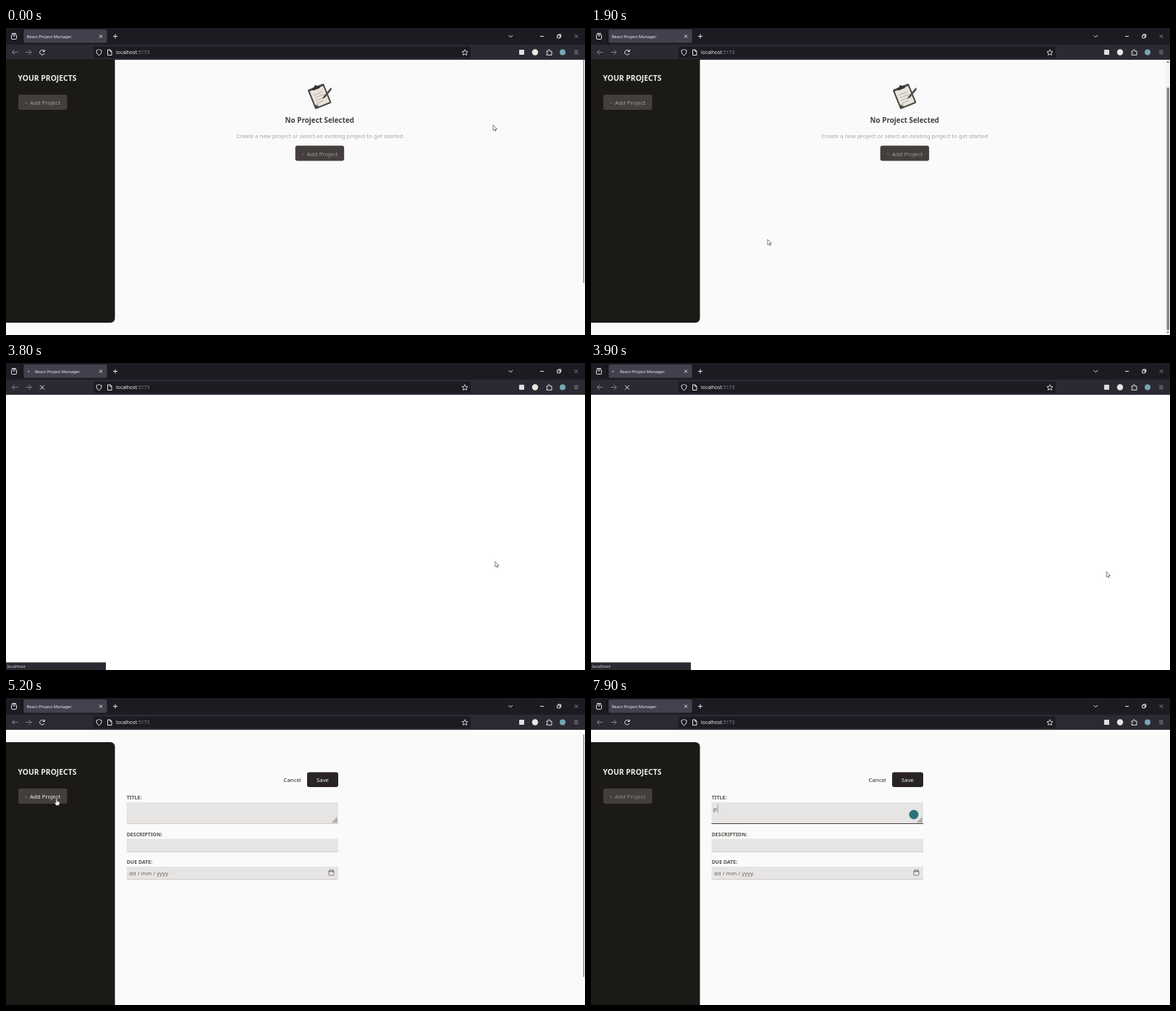
Animation of 800 by 424 pixels, one loop 8 s. Source, as an HTML page:

```html
<!DOCTYPE html>
<html lang="en">
<head>
<meta charset="utf-8">
<title>Project manager</title>
<style>
  html, body { margin: 0; width: 100%; height: 100%; overflow: hidden; background: #fafafa; }
  svg { display: block; width: 800px; height: 424px; font: 7.83px "Noto Sans", "Open Sans", sans-serif; }
  .line { fill: none; stroke: #e6e6ea; stroke-width: 1; }
  .dim { stroke: #85848c; }
  .mid { text-anchor: middle; }
  .label { font-size: 7px; font-weight: 700; fill: #57534e; }
  .field { fill: #e7e5e4; }
  .edge { fill: #d0cdca; }

  /* One 8 s loop; 1.25% is 100 ms. */
  .step { animation: 8s step-end infinite; }
  #page { animation-name: page; }
  #scroll { animation-name: scroll; }
  #empty { animation-name: empty; }
  #form { animation-name: form; }
  #addText { animation-name: addText; }
  #focus, #badge { animation-name: focus; }
  #caret { animation-name: caret; }
  #typed { animation-name: typed; }
  #thin { animation-name: thin; }
  #thick { animation-name: thick; }
  #tabTitle { animation-name: tabTitle; }
  #throbber { animation-name: throbber; }
  #hover { animation-name: hover; }
  #reload { animation-name: reload; }
  #stop { animation-name: stop; }
  #status { animation-name: page; animation-name: status; }
  #arrow { animation-name: arrow; }
  #hand { animation-name: hand; }
  #beam { animation-name: beam; }
  #dot { animation: dot .5s ease-in-out infinite alternate; }
  #cursor { animation: move 8s ease-in-out infinite; }

  @keyframes page { 0% { opacity: 1 } 43.75% { opacity: 0 } 52.5%, 100% { opacity: 1 } }
  @keyframes scroll { 0% { transform: translateY(-33px) } 52.5%, 100% { transform: none } }
  @keyframes empty { 0% { opacity: 1 } 65%, 100% { opacity: 0 } }
  @keyframes form { 0% { opacity: 0 } 65%, 100% { opacity: 1 } }
  @keyframes addText { 0% { fill: #a29c98 } 58.75% { fill: #f0efed } 68.75%, 100% { fill: #8f8984 } }
  @keyframes focus { 0% { opacity: 0 } 77.5%, 100% { opacity: 1 } }
  @keyframes caret {
    0% { opacity: 0 } 77.5% { opacity: 1 } 83.75% { opacity: 0 } 90% { opacity: 1 }
    96.25% { opacity: 0 } 97.5%, 100% { opacity: .6; transform: translateX(6px) }
  }
  @keyframes typed { 0% { opacity: 0 } 97.5%, 100% { opacity: 1 } }
  @keyframes thin {
    0% { opacity: 1 } 7.5% { opacity: 0 } 30% { opacity: 1 } 83.75%, 100% { opacity: 0 }
  }
  @keyframes thick { 0% { opacity: 0 } 20% { opacity: 1 } 30%, 100% { opacity: 0 } }
  @keyframes tabTitle { 0% { transform: none } 36.25% { transform: translateX(11.3px) } 52.5%, 100% { transform: none } }
  @keyframes throbber { 0% { opacity: 0 } 36.25% { opacity: 1 } 52.5%, 100% { opacity: 0 } }
  @keyframes hover { 0% { opacity: 0 } 35% { opacity: 1 } 42.5%, 100% { opacity: 0 } }
  @keyframes reload { 0% { opacity: 1 } 42.5% { opacity: 0 } 52.5%, 100% { opacity: 1 } }
  @keyframes stop { 0% { opacity: 0 } 42.5% { opacity: 1 } 52.5%, 100% { opacity: 0 } }
  @keyframes status { 0% { opacity: 0 } 43.75% { opacity: 1 } 52.5%, 100% { opacity: 0 } }
  @keyframes arrow { 0% { opacity: 1 } 58.75% { opacity: 0 } 68.75% { opacity: 1 } 72.5%, 100% { opacity: 0 } }
  @keyframes hand { 0% { opacity: 0 } 58.75% { opacity: 1 } 68.75%, 100% { opacity: 0 } }
  @keyframes beam { 0% { opacity: 0 } 72.5% { opacity: 1 } 97.5%, 100% { opacity: 0 } }
  @keyframes dot { from { transform: translateX(-2px) } to { transform: translateX(2px) } }
  @keyframes move {
    0%, 18.75% { transform: translate(673px, 134px) }
    21.25% { transform: translate(794px, 190px) }
    23.75%, 27.5% { transform: translate(244px, 292px) }
    31.25% { transform: translate(190px, 216px) }
    36.25%, 41.25% { transform: translate(50px, 34px) }
    48.75%, 53.75% { transform: translate(712px, 288px) }
    60%, 67.5% { transform: translate(69px, 139px) }
    75%, 100% { transform: translate(221px, 162px) }
  }
</style>
</head>
<body>
<svg viewBox="0 0 800 424">
  <defs>
    <g id="addShape">
      <rect width="67.5" height="21" rx="3" fill="#443f3c"/>
    </g>
  </defs>
  <rect width="800" height="424" fill="#fff"/>

  <g id="page" class="step">
    <rect y="43" width="800" height="381" fill="#fafafa"/>
    <g id="scroll" class="step">
      <path d="M0 61H144.500a6 6 0 0 1 6 6V434a6 6 0 0 1-6 6H0z" fill="#1b1a17"/>
      <text x="16.500" y="105.500" font-size="10.350" font-weight="700" fill="#edecea">YOUR PROJECTS</text>
      <use href="#addShape" x="17" y="125"/>
      <text x="25.500" y="139" fill="#77706b">+</text>
      <text id="addText" class="step" x="33" y="139">Add Project</text>

      <g id="empty" class="step">
        <g transform="translate(433 127) rotate(-22)">
          <rect x="-12" y="-14" width="24" height="29" rx="1.500" fill="#4a4643"/>
          <path d="M-10-11H10V13H-6L-10 9z" fill="#e9e4da"/>
          <path d="M-10 9H-6V13z" fill="#b9b2a7"/>
          <path d="M-7-4H6M-7 0H7M-7 4H5M-7 8H3" stroke="#aaa398" stroke-width=".8"/>
          <path d="M-5-10V-14H-2a2 2 0 0 1 4 0H5V-10z" fill="#34312f"/>
        </g>
        <path d="M449 115L439 127L437 131L441 129L450 118z" fill="#514f50"/>
        <text class="mid" x="433.300" y="163.700" font-size="9.850" font-weight="700" fill="#44403c">No Project Selected</text>
        <text class="mid" x="433.300" y="184.500" fill="#a8a29e">Create a new project or select an existing project to get started</text>
        <use href="#addShape" x="399.700" y="195.500"/>
        <text x="408.500" y="209.500" fill="#77706b">+</text>
        <text x="416" y="209.500" fill="#a29c98">Add Project</text>
      </g>

      <g id="form" class="step">
        <text x="383.500" y="116" fill="#292524">Cancel</text>
        <rect x="416" y="102.500" width="43" height="20.500" rx="3" fill="#292325"/>
        <text class="mid" x="437.500" y="116" fill="#f5f5f4">Save</text>

        <text class="label" x="166.700" y="139.700">TITLE:</text>
        <rect class="field" x="166.500" y="144" width="292.500" height="30"/>
        <rect class="edge" x="166.500" y="173" width="292.500" height="1"/>
        <rect id="focus" class="step" x="166.500" y="173" width="292.500" height="1" fill="#45413e"/>
        <circle id="badge" class="step" cx="446" cy="161" r="6.500" fill="#2b7378"/>
        <path d="M449.500 172.300L457.800 164V172.300z" fill="#b2aeab"/>
        <text id="typed" class="step" x="169" y="156" fill="#57534e">p</text>
        <path id="caret" class="step" d="M169.300 147V158.500" stroke="#57534e" stroke-width=".9"/>

        <text class="label" x="166.700" y="190.500">DESCRIPTION:</text>
        <rect class="field" x="166.500" y="194.500" width="292.500" height="18.500"/>
        <rect class="edge" x="166.500" y="212" width="292.500" height="1"/>

        <text class="label" x="166.700" y="229">DUE DATE:</text>
        <rect class="field" x="166.500" y="233" width="292.500" height="18"/>
        <rect class="edge" x="166.500" y="250" width="292.500" height="1"/>
        <text x="170" y="245" fill="#6b6663">dd / mm / yyyy</text>
        <rect x="446" y="238" width="7" height="7" rx="1" fill="none" stroke="#6b6663" stroke-width=".8"/>
        <path d="M446 239.700H453M447.800 236.800V238.500M451.300 236.800V238.500" stroke="#6b6663"/>
      </g>

      <rect id="thin" class="step" x="797.500" y="50" width="1.500" height="335.500" rx=".7" fill="#8d8d8d" transform-origin="0 0"/>
    </g>
    <g id="thick" class="step">
      <rect x="793.500" y="43" width="6.500" height="381" fill="#f3f3f3"/>
      <rect x="795.500" y="82" width="3.500" height="335.500" rx="1.700" fill="#868686"/>
      <path d="M795 48L797 45.500L799 48zM795 419.500L797 422L799 419.500z" fill="#777"/>
    </g>
  </g>

  <g id="chrome">
    <rect width="800" height="23.500" fill="#1c1b22"/>
    <rect y="23" width="800" height="20.500" fill="#2b2a33"/>
    <rect y="43" width="800" height=".7" fill="#17161c"/>
    <path d="M22 2V21" stroke="#0f0e13"/>
    <rect x="24.500" y="2" width="115" height="18.500" rx="2" fill="#42414d"/>
    <rect x="121" y="25.500" width="521" height="16" rx="2" fill="#1c1b22"/>
    <g class="line">
      <rect x="7.500" y="9" width="7" height="6.500" rx="1.300"/>
      <path d="M8 7.500H14M9.500 11H12.500"/>
      <path d="M129 9.500L133 13.500M133 9.500L129 13.500M148 11.500H154M151 8.500V14.500"/>
      <path d="M694.500 10L697.300 12.800L700 10M738 11.500H743M761.700 10H765.500V13.800H761.700zM763 10V8.800H766.800V12.500H765.500"/>
      <path d="M785.500 9L790.500 14M790.500 9L785.500 14" class="dim"/>
      <path class="dim" d="M16.500 33.500H8.500M12 30L8.500 33.500L12 37M27.500 33.500H35M31.500 30L35 33.500L31.500 37"/>
      <path d="M128.500 29.500C130 30.500 131 30.500 132 30.800C132.300 34 131 36.500 128.500 37.800C126 36.500 124.700 34 125 30.800C126 30.500 127 30.500 128.500 29.500z"/>
      <path d="M140.500 30H144L146 32V37.500H140.500zM143.800 30V32.300H146"/>
      <path stroke-width=".9" d="M634 29.800L635.200 32.400L638 32.700L635.900 34.600L636.500 37.400L634 36L631.500 37.400L632.100 34.600L630 32.700L632.800 32.400z"/>
      <path d="M747 32H749C748.500 29 752 29 751.500 32H754V37.300H747V35.500C749 35.500 749 33.500 747 33.500z"/>
      <path class="dim" d="M785 31.300H790.500M785 33.500H790.500M785 35.700H790.500"/>
    </g>
    <rect x="709" y="30" width="7" height="7" rx="1" fill="#dedee2"/>
    <circle cx="731" cy="33.500" r="4.200" fill="#e8e8e4"/>
    <circle cx="769" cy="33.500" r="4" fill="#78a6b6"/>
    <text id="tabTitle" class="step" x="28.700" y="13.900" font-size="5.830" fill="#f2f2f5">React Project Manager</text>
    <g id="throbber" class="step"><circle id="dot" cx="32" cy="11.800" r="1" fill="#c9c9d2"/></g>
    <text x="152" y="36" font-size="6.850" fill="#efeff2">localhost<tspan fill="#85848c">:5173</tspan></text>

    <rect id="hover" class="step" x="41.500" y="25.500" width="17" height="16" rx="2" fill="#55545e"/>
    <path id="reload" class="step line" d="M52.800 32A3.300 3.300 0 1 0 53 35M53.300 29.800V32.500H50.600"/>
    <path id="stop" class="step line" d="M47 30.700L53 36.700M53 30.700L47 36.700"/>
  </g>

  <g id="status" class="step">
    <rect y="413.500" width="138" height="10.500" fill="#2b2a33"/>
    <text x="1.500" y="421.300" font-size="6" fill="#d5d5da">localhost</text>
  </g>

  <g id="cursor" stroke="#4b4b4b" stroke-width=".7" fill="#fff">
    <path id="arrow" class="step" d="M0 0V7.500L1.800 6L3 8.600L4.200 8L3 5.600H5.500z"/>
    <path id="hand" class="step" d="M0 0.500Q.9-.5 1.700.5V3.500L5 4.500V7L4 9.300H.5L-2 6L-1.500 5L0 6z"/>
    <path id="beam" class="step" d="M-1.700-3H1.700M0-3V4M-1.700 4H1.700" fill="none"/>
  </g>
</svg>
</body>
</html>
```
